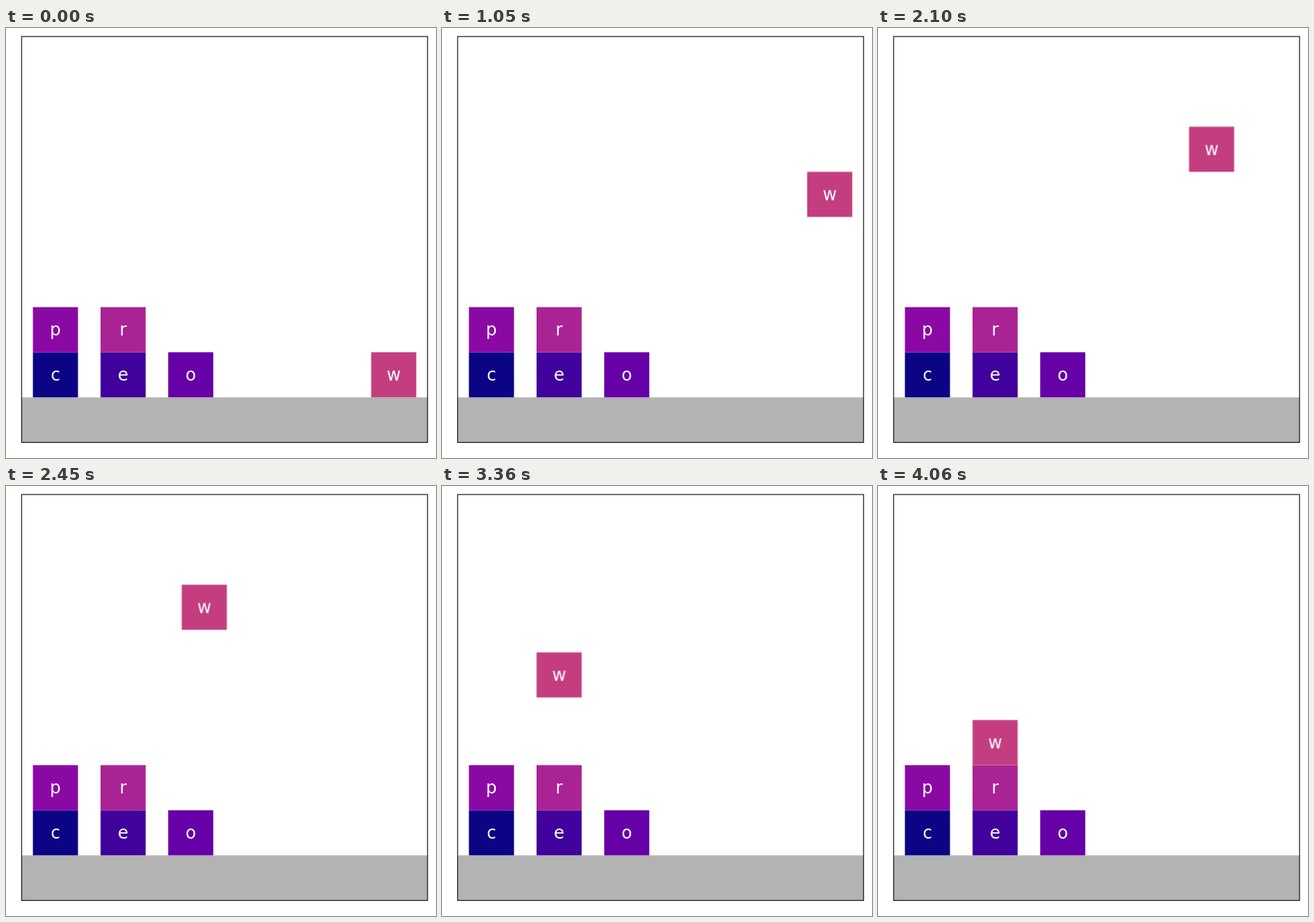
An HTML page for the animation above (5060 ms loop, 600 by 600 pixels).

```html
<!DOCTYPE html>
<html lang="en">
<head>
<meta charset="utf-8">
<title>Stacking blocks</title>
<style>
  html, body { margin: 0; width: 100%; height: 100%; overflow: hidden; background: #fff; }
  svg { display: block; width: 100vw; height: 100vh; }
  .block rect { width: 62.93px; height: 62.93px; }
  .block text {
    font: 24px "DejaVu Sans", sans-serif;
    fill: #fff;
    text-anchor: middle;
  }
  .mover { animation: carry 5060ms infinite; }

  /* lift, wait, slide left, lower; one step every 70 ms */
  @keyframes carry {
    0%       { transform: translate(0, 0); animation-timing-function: step-end; }
    1.3833%  { transform: translate(0, -31.47px); animation-timing-function: steps(18, end); }
    26.2845% { transform: translate(0, -314.67px); animation-timing-function: step-end; }
    41.5019% { transform: translate(-75.52px, -314.67px); animation-timing-function: steps(8, end); }
    52.5691% { transform: translate(-377.6px, -314.67px); animation-timing-function: steps(20, end); }
    80.2371%, 100% { transform: translate(-377.6px, -125.87px); animation-timing-function: step-end; }
  }
</style>
</head>
<body>
<svg viewBox="0 0 600 600">
  <rect x="21.8" y="515.37" width="566.4" height="62.93" fill="#b3b3b3"/>

  <g class="block" transform="translate(37.53 452.43)">
    <rect fill="#0b0586"/><text x="31.47" y="39.2">c</text>
  </g>
  <g class="block" transform="translate(131.93 452.43)">
    <rect fill="#40019c"/><text x="31.47" y="39.2">e</text>
  </g>
  <g class="block" transform="translate(226.33 452.43)">
    <rect fill="#6600a7"/><text x="31.47" y="39.2">o</text>
  </g>
  <g class="block" transform="translate(37.53 389.5)">
    <rect fill="#8a09a5"/><text x="31.47" y="39.2">p</text>
  </g>
  <g class="block" transform="translate(131.93 389.5)">
    <rect fill="#aa2394"/><text x="31.47" y="39.2">r</text>
  </g>
  <g class="mover">
    <g class="block" transform="translate(509.53 452.43)">
      <rect fill="#c43e7f"/><text x="31.47" y="39.2">w</text>
    </g>
  </g>

  <rect x="21.8" y="11.9" width="566.4" height="566.4" fill="none" stroke="#000" stroke-width="1.1"/>
</svg>
</body>
</html>
```
